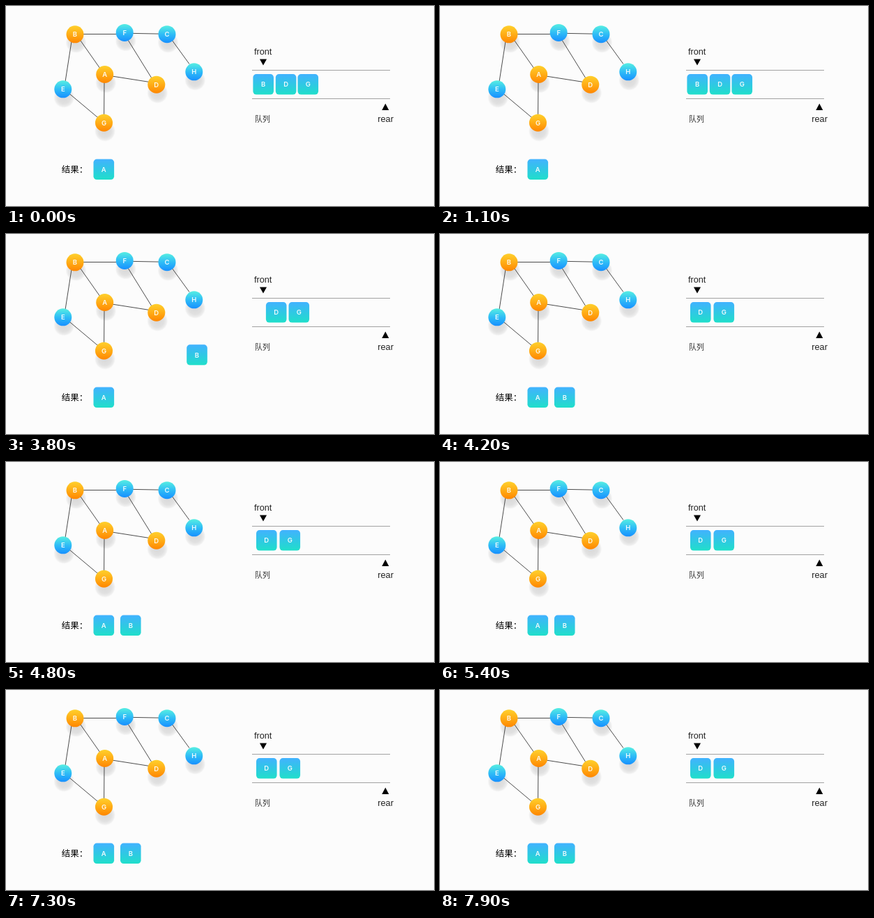
Write an HTML page with a canvas that moves like this. It is 614 by 288 pixels and loops after 8000 ms.

```html
<!DOCTYPE html>
<html lang="zh">
<head>
<meta charset="utf-8">
<title>Breadth-first search</title>
<style>
html, body { margin: 0; width: 614px; height: 288px; overflow: hidden; background: #fcfcfc; }
canvas { display: block; }
</style>
</head>
<body>
<canvas id="stage" width="614" height="288"></canvas>
<script>
const ctx = document.getElementById('stage').getContext('2d');
const LOOP = 8000, STEP = 100;
const MOVE_START = 3400, MOVE_END = 4200;
const LATIN = '"Liberation Sans", Arial, sans-serif';
const CJK = '"Noto Sans CJK SC", "Noto Sans CJK", sans-serif';
const LABEL = '600 9.5px Inter, sans-serif';

const BLUE = ['#56eee2', '#2fbdf6', '#1790ff'];
const ORANGE = ['#ffd02c', '#ffad16', '#ff8600'];
const TILE = ['#42b2ff', '#2fc8e4', '#20dfca'];

const nodes = {
  A: [141.7, 98.5, ORANGE], B: [99, 40.8, ORANGE], C: [231, 40.7, BLUE],
  D: [215.8, 113.2, ORANGE], E: [81.8, 119.8, BLUE], F: [170.2, 38.4, BLUE],
  G: [140.5, 168.2, ORANGE], H: [269.8, 94.8, BLUE]
};

// Line ends lie under the node discs, not always at their centres
const edges = [
  [105, 40.5, 165, 40.5], [176, 39.3, 225, 40.2], [238, 49, 263, 83.5],
  [94, 51, 85, 109], [107, 50, 135, 90], [175, 49, 209, 104],
  [152, 101, 206, 109.5], [141, 108, 140.6, 158], [90, 125.5, 131, 160]
];

// Tile centres before and after the dequeue
const tiles = [
  { label: 'A', from: [140.3, 235.3], to: [140.3, 235.3] },
  { label: 'D', from: [401.6, 112.8], to: [373.8, 112.8] },
  { label: 'G', from: [433.3, 112.8], to: [407.3, 112.8] },
  { label: 'B', from: [369.2, 112.8], to: [178.8, 235.3] }
];

const mix = (a, b, p) => a + (b - a) * p;
const ease = p => p * p * (3 - 2 * p);

function fade(top, bottom, colors) {
  const g = ctx.createLinearGradient(0, top, 0, bottom);
  colors.forEach((c, i) => g.addColorStop(i / (colors.length - 1), c));
  return g;
}

function text(str, x, y, font, color, align = 'left') {
  ctx.font = font;
  ctx.fillStyle = color;
  ctx.textAlign = align;
  ctx.fillText(str, x, y);
}

function letter(str, x, y) {
  text(str, x, y + 3.5, LABEL, 'rgba(255,255,255,.92)', 'center');
}

function line(x1, y1, x2, y2, color) {
  ctx.strokeStyle = color;
  ctx.lineWidth = 1;
  ctx.beginPath();
  ctx.moveTo(x1, y1);
  ctx.lineTo(x2, y2);
  ctx.stroke();
}

function triangle(x, base, tip) {
  ctx.fillStyle = '#000';
  ctx.beginPath();
  ctx.moveTo(x - 5, base);
  ctx.lineTo(x + 5, base);
  ctx.lineTo(x, tip);
  ctx.fill();
}

function shadow(x, y) {
  const cx = x + 1.5, cy = y + 12, r = 15;
  const g = ctx.createRadialGradient(cx, cy, 0, cx, cy, r);
  g.addColorStop(0, 'rgba(0,0,0,.14)');
  g.addColorStop(0.6, 'rgba(0,0,0,.11)');
  g.addColorStop(0.85, 'rgba(0,0,0,.06)');
  g.addColorStop(1, 'rgba(0,0,0,0)');
  ctx.fillStyle = g;
  ctx.fillRect(cx - r, cy - r, 2 * r, 2 * r);
}

function node(label, [x, y, colors]) {
  const r = 12.5;
  ctx.fillStyle = fade(y - r, y + r, colors);
  ctx.beginPath();
  ctx.arc(x, y, r, 0, Math.PI * 2);
  ctx.fill();
  letter(label, x, y);
}

function tile({ label, from, to }, p) {
  const x = mix(from[0], to[0], p), y = mix(from[1], to[1], p), h = 14.8;
  ctx.fillStyle = fade(y - h, y + h, TILE);
  ctx.beginPath();
  ctx.roundRect(x - h, y - h, 2 * h, 2 * h, 4.8);
  ctx.fill();
  letter(label, x, y);
}

function graph() {
  for (const [x, y] of Object.values(nodes)) shadow(x, y);
  for (const ends of edges) line(...ends, '#4c4c4c');
  for (const key in nodes) node(key, nodes[key]);
}

function queue() {
  line(353, 92.5, 551, 92.5, '#a2a2a2');
  line(353, 133.5, 551, 133.5, '#a2a2a2');
  text('front', 356, 70, '12.7px ' + LATIN, '#222');
  text('rear', 533.3, 167, '12.7px ' + LATIN, '#222');
  triangle(369, 76.5, 85.5);
  triangle(544.3, 150, 140.5);
  text('队列', 357, 166.6, '11px ' + CJK, '#333');
  text('结果：', 79.8, 240, '12.5px ' + CJK, '#000');
}

function draw(now) {
  const t = Math.floor((now % LOOP) / STEP) * STEP;
  const raw = (t - MOVE_START) / (MOVE_END - MOVE_START);
  const p = ease(Math.min(1, Math.max(0, raw)));
  ctx.fillStyle = '#fcfcfc';
  ctx.fillRect(0, 0, 614, 288);
  graph();
  queue();
  for (const item of tiles) tile(item, p);
}

const start = performance.now();
function tick() {
  draw(performance.now() - start);
  requestAnimationFrame(tick);
}
tick();
</script>
</body>
</html>
```
